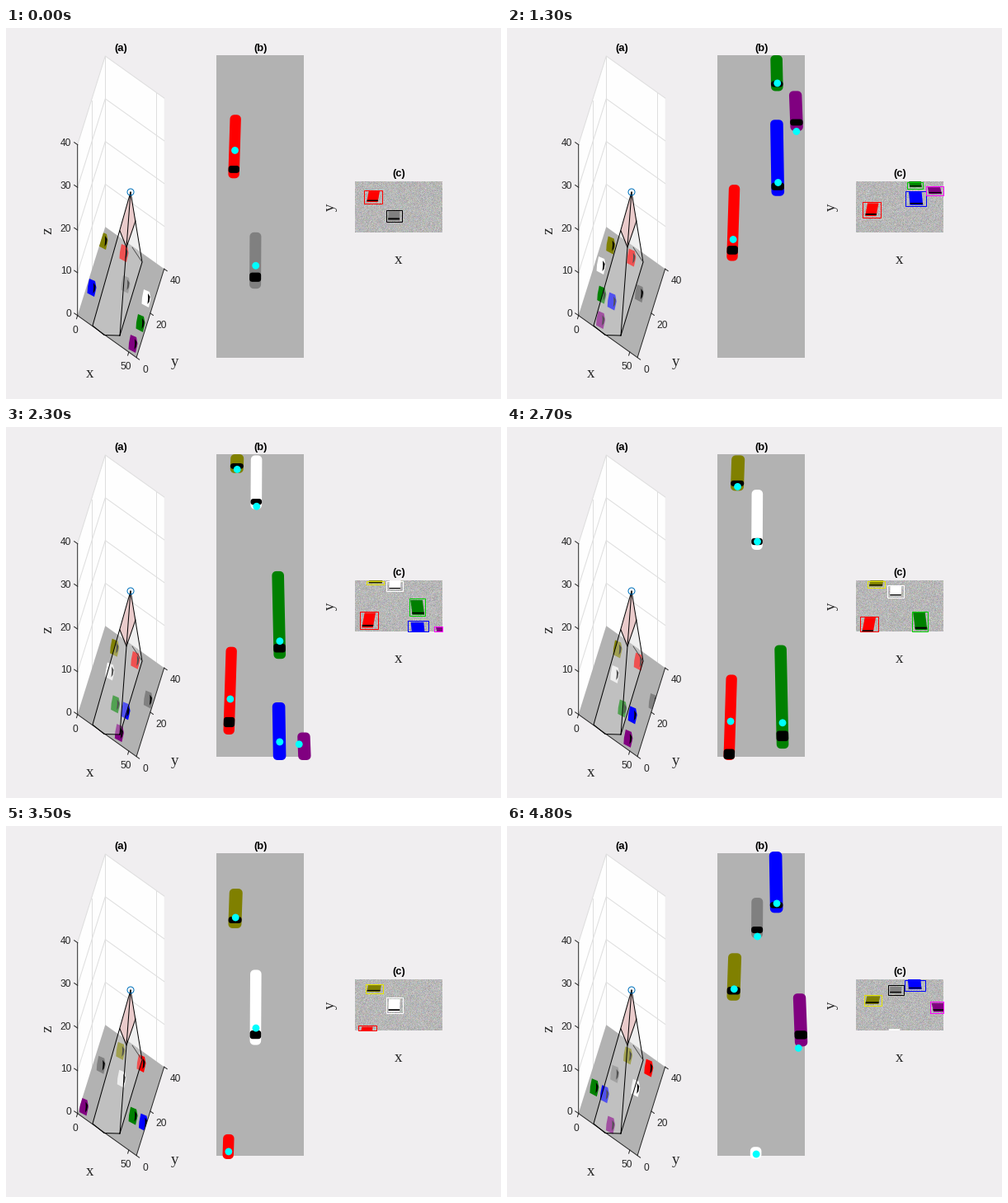
Animation, 600 px wide and 450 px high, one loop 4900 ms. Source, as a matplotlib script:

```python
import numpy as np
import matplotlib.pyplot as plt
from matplotlib.animation import FuncAnimation
from matplotlib.patches import Circle, Polygon, Rectangle

FRAMES, STEP = 49, 100
PX = 0.72  # points per pixel at 100 dpi
INK = "#262626"
HORIZON = 320  # road speed grows with y + HORIZON
GROWTH = 1.665

plt.rcParams["font.family"] = "Liberation Sans"
fig = plt.figure(figsize=(6, 4.5), dpi=100, facecolor="#f0eef0")
ax = fig.add_axes([0, 0, 1, 1])
ax.axis("off")

# start: centre in (a); road: top, bottom, window at time ref in (b)
# lane: x offset and slope; dot: (time, offset from window) pairs
CARS = [
    dict(color="#808000", box="#e6e600", start=(118, 258), period=120, ref=35,
         road=(76, 124, 114), lane=(281.5, -.034), half=8, pad=10.5,
         dot=[(-8, 4), (0, -3), (7, -8), (13, -2)]),
    dict(color="#ff0000", box="#ff0000", start=(143, 273), period=119, ref=7,
         road=(149, 234, 222), lane=(281.6, -.031), half=6.7, pad=11,
         dot=[(-7, -23), (0, -10), (12, -16), (20, -40), (28, -87)]),
    dict(color="#808080", box="#000000", start=(145, 311), period=60, ref=48,
         road=(87, 136, 126), lane=(303.8, -.0055), half=7, pad=9.5,
         dot=[(-6, 5), (0, 8), (12, -14), (17, -50)], last=360),
    dict(color="#ffffff", box="#ffffff", start=(170, 328), period=60, ref=27,
         road=(76, 149, 139), lane=(303.8, -.0055), half=6.8, pad=10,
         dot=[(-8, 11), (0, 0), (8, -8), (15, -22), (21, -103)]),
    dict(color="#0000ff", box="#0000ff", start=(104, 315), period=40, ref=7,
         road=(16, 88, 79), lane=(325, .0165), half=7.8, pad=12.5,
         dot=[(0, 0), (1, -2), (12, -8), (15, -49), (18, -126)]),
    dict(color="#008000", box="#00d000", start=(163, 358), period=40, ref=19,
         road=(99, 189, 178), lane=(325.8, .0215), half=7.3, pad=9.5,
         dot=[(0, -1), (8, -16), (12, -113)]),
    dict(color="#800080", box="#ff00ff", start=(154, 383), period=30, ref=12,
         road=(55, 101, 91), lane=(346.5, .0385), half=7.7, pad=10.5,
         dot=[(0, 10), (6, 16), (7, 20), (11, -52)], dot_lane=(348.7, .017)),
]

BODY = np.array([(-3, -11), (4, -8), (5.5, 0), (3, 11), (-5.5, 6.5), (-5, -1)])
GLASS = np.array([(2, -6), (4.6, -2), (3.6, 4), (1.5, 7), (2.2, 0)])
ORIGIN, EAST, NORTH = map(np.array, ((86.7, 348.7), (71.4, 51), (33.6, -107.5)))


def poly(points, color, z, **kw):
    kw.setdefault("lw", 0)
    return ax.add_patch(Polygon(points, fc=color, zorder=z, **kw))


def line(points, color, z, width=1):
    xs, ys = zip(*points)
    ax.plot(xs, ys, color=color, lw=width * PX, zorder=z)


def text(x, y, label, size=12, color=INK, **kw):
    ax.text(x, y, label, fontsize=size * PX, color=color, ha="center",
            va="center_baseline" if size == 12 else "center", **kw)


def spot(a, b, z=0):
    return ORIGIN + a * EAST + b * NORTH - np.array((0, 5.18 * z))


def draw_scene():
    poly([spot(0, 0), spot(0, 1), spot(0, 1, 40), spot(0, 0, 40)], "#fefefe", 1)
    poly([spot(0, 1), spot(1, 1), spot(1, 1, 40), spot(0, 1, 40)], "#fefefe", 1)
    for z in (10, 20, 30, 40):
        line([spot(0, 0, z), spot(0, 1, z), spot(1, 1, z)], "#dedede", 2)
    for a, b in ((0, .5), (0, 1), (.87, 1)):
        line([spot(a, b), spot(a, b, 40)], "#dedede", 2)
    poly([spot(0, 0), spot(1, 0), spot(1, 1), spot(0, 1)], "#b2b2b2", 3)

    line([spot(0, 0, 40), spot(0, 0), spot(1, 0), spot(1, 1)], INK, 7)
    for z in range(0, 41, 10):
        p = spot(0, 0, z)
        line([p, p - (4, 2.8)], INK, 7)
        text(72.5 if z else 75.5, p[1] - 3, str(z))
    for a, label, at in ((0, "0", (84, 366)), (.87, "50", (145, 409))):
        p = spot(a, 0)
        line([p, p + (-1.2, 4)], INK, 7)
        text(*at, label)
    for b, label, at in ((0, "0", (169, 414)), (.5, "20", (188, 360)),
                         (1, "40", (205, 306))):
        p = spot(1, b)
        line([p, p + (3.5, 2.5)], INK, 7)
        text(*at, label)

    # camera and its field of view
    eye, left, low, right = (151, 199), (105, 361), (138, 373), (165, 284)
    edge = (119, 372.5)
    poly([eye, left, edge, low, right], "#d7d7d7", 5, alpha=.38)
    poly([eye, (138, 246), (146, 266), (157, 234)], "#e8b8b8", 5, alpha=.65)
    line([eye, left, edge, low, eye, right, low], "black", 8)
    line([(138, 246), (146, 266), (157, 234)], "black", 8)
    line([right, (153, 266)], "#404040", 8, .8)
    ax.add_patch(Circle(eye, 4, fill=False, ec="#0072bd", lw=PX, zorder=9))

    ax.add_patch(Rectangle((255, 33.4), 106, 366.6, fc="#b2b2b2", lw=0))
    for x, y, label in ((139.5, 25, "(a)"), (308.5, 25, "(b)"), (476, 177, "(c)")):
        text(x, y, label, 13, "black", weight="bold")
    for x, y, label, turn in ((102, 420, "x", 0), (205, 405.5, "y", 0),
                              (51, 246, "z", 90), (476, 281, "x", 0),
                              (393.5, 217, "y", 90)):
        text(x, y, label, 19, family="Liberation Serif", rotation=turn)


draw_scene()
panel = Rectangle((423.5, 186), 105.5, 62, fc="none", lw=0)
ax.add_patch(panel)
noise = ax.imshow(np.zeros((62, 106, 3)), extent=(423, 529, 248, 186),
                  interpolation="nearest", aspect="auto", zorder=2)
ax.set(xlim=(0, 600), ylim=(450, 0))
limits = Polygon([spot(0, -.3), spot(1, -.3), spot(1, 1.3), spot(0, 1.3)],
                 fc="none", lw=0)
ax.add_patch(limits)
live = []


def model_car(car, n):
    start = np.array(car["start"])
    dx, dy = start - ORIGIN
    a0 = (dx * NORTH[1] - dy * NORTH[0]) / (EAST[0] * NORTH[1] - EAST[1] * NORTH[0])
    a = (a0 + n / car["period"] - .01) % 1 + .01
    at = start + (a - a0) * EAST
    for shape, color in ((BODY, car["color"]), (GLASS, "black")):
        p = poly(shape + at, color, 4)
        p.set_clip_path(limits)
        live.append(p)


def streak(x, y1, y2, half, color, z, r):
    r = max(min(r, (y2 - y1) / 2 - .1), .2)
    w, a, b = half - r, y1 + r, y2 - r
    live.append(poly([(x(a) - w, a), (x(a) + w, a), (x(b) + w, b), (x(b) - w, b)],
                     color, z, ec=color, lw=2 * r * PX, joinstyle="round"))


def flat(x, y1, y2, half, color, z):
    p = poly([(x(y) + 168 + s * half, to_image(y))
              for y, s in ((y1, -1), (y1, 1), (y2, 1), (y2, -1))], color, z)
    p.set_clip_path(panel)
    live.append(p)


def to_image(y):
    return 186 + (y - 34) * 62 / 366


def road_car(car, n):
    dt = (n - car["ref"] + 12) % car["period"] - 12
    scale = np.exp(GROWTH / car["period"] * dt)
    top, bottom, glass = (np.array(car["road"]) + HORIZON) * scale - HORIZON
    if bottom < 36 or top > 400:
        return
    x0, slope = car["lane"]
    x = lambda y: x0 + slope * y
    half = car["half"]
    streak(x, max(top, 31 if top > 25 else 33), min(bottom, 404), half,
           car["color"], 4, 5)
    flat(x, top, bottom, half, car["color"], 4)
    deep = .009 * (glass + HORIZON)
    if 34 < glass < 401:
        streak(x, max(glass - deep, 33), min(glass + deep, 403), half, "black", 5, 3)
        flat(x, glass - deep, glass + deep, half, "black", 5)

    if glass < 36 or top > car.get("last", 396):
        return
    times, shifts = zip(*car["dot"])
    y = min(glass + np.interp(dt, times, shifts), 398)
    d0, ds = car.get("dot_lane", (x0 + .5, slope))
    live.append(ax.add_patch(Circle((d0 + ds * y, y), 4.4, fc="cyan", lw=0, zorder=7)))
    if top < 388:
        mid = x((max(top, 34) + min(bottom, 400)) / 2) + 168
        l, r = max(mid - car["pad"], 423.5), min(mid + car["pad"], 528.5)
        t, b = max(to_image(top) - 1.5, 186.5), min(to_image(bottom) + 1.5, 247.5)
        live.append(ax.add_patch(Rectangle((l, t), r - l, b - t, fill=False,
                                           ec=car["box"], lw=PX, zorder=6)))


def draw(n):
    while live:
        live.pop().remove()
    rng = np.random.default_rng(n)
    grain = rng.normal(0, 8, (62, 106, 1)) + rng.normal(0, 7, (62, 106, 3))
    noise.set_data(np.clip(183 + grain, 0, 255) / 255)
    for car in CARS:
        model_car(car, n)
        road_car(car, n)
    return live


anim = FuncAnimation(fig, draw, frames=FRAMES, interval=STEP, repeat=True,
                     repeat_delay=0, init_func=lambda: live)
plt.show()
```
